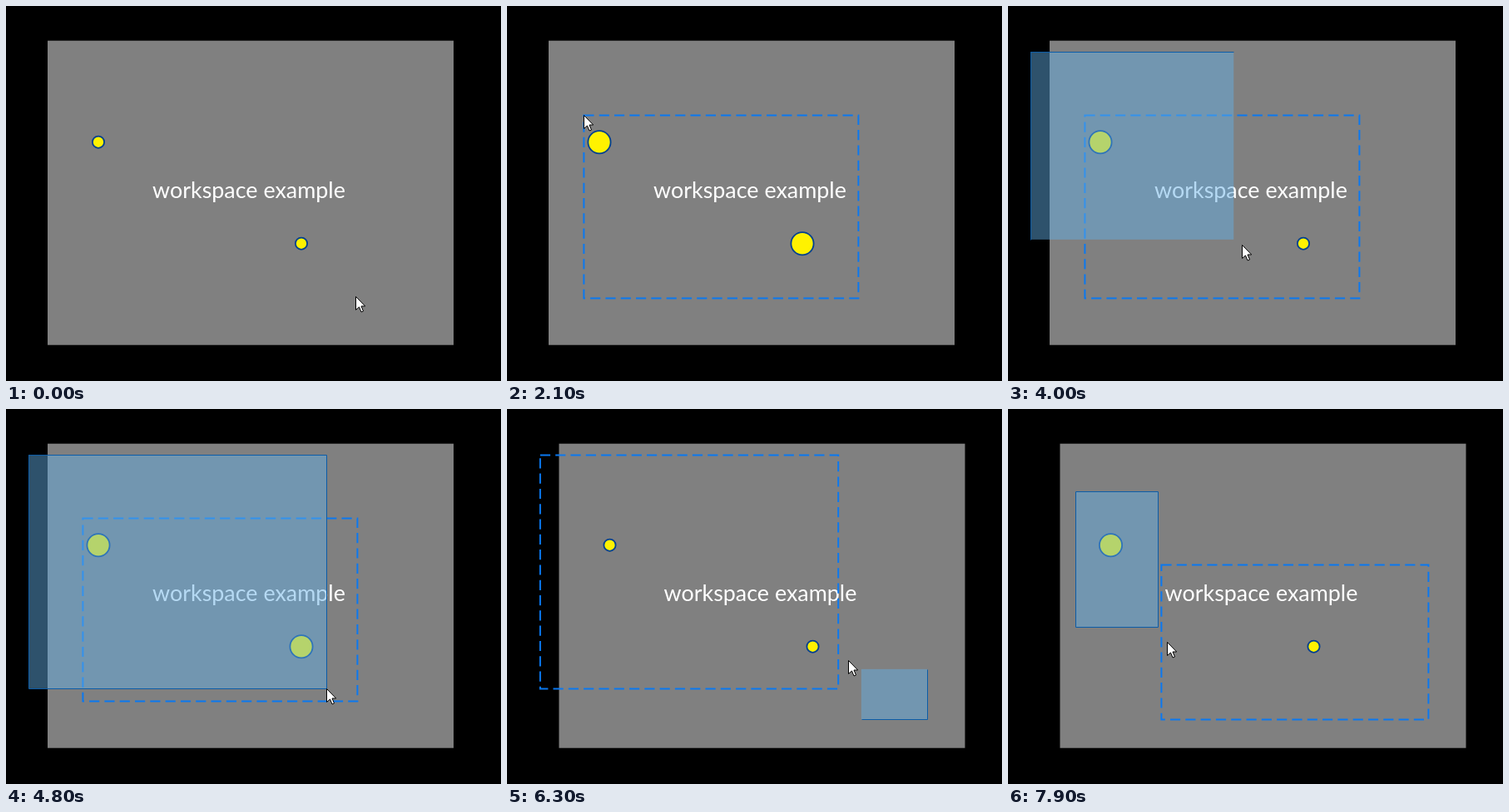
These frames come from a looping animation (595x451 px, 8 s). An HTML page with a canvas:

```html
<!DOCTYPE html>
<html lang="en">
<head>
<meta charset="utf-8">
<title>Workspace selection</title>
<style>
  html, body { margin: 0; width: 100%; height: 100%; overflow: hidden; background: #000; }
  canvas { display: block; }
</style>
</head>
<body>
<canvas id="stage" width="595" height="451"></canvas>
<script>
const ctx = document.getElementById('stage').getContext('2d');
const LOOP = 8000, STEP = 100, SCALE = 1.22;

// Pointer path: time, x, y
const path = [
  [0, 420, 349], [100, 422, 351], [200, 422, 351], [900, 151, 165],
  [1100, 95, 144], [1300, 92, 131], [2400, 92, 131], [3000, 27, 65],
  [3100, 27, 65], [3300, 27, 55], [3400, 27, 55], [4000, 281, 287],
  [4400, 384, 335], [4600, 384, 335], [4800, 385, 336], [4950, 385, 336],
  [5700, 505, 373], [5800, 505, 373], [6300, 410, 302], [6700, 184, 187],
  [6950, 184, 187], [7450, 81, 99], [7500, 81, 99], [7900, 191, 280]
];

// The marquee trails the pointer by `lag` and gets its full outline at `settle`.
const drags = [
  { from: 200, to: 2100, settle: 1300, lag: 17 },
  { from: 3400, to: 5000, settle: 4600, lag: 28 },
  { from: 5800, to: 6900, settle: 6750, lag: 56 },
  { from: 7500, to: LOOP, settle: 7500, lag: 36 }
];
const dots = [[50, 100], [250, 200]];

function slope(i, axis) {
  const a = path[i], b = path[i + 1];
  return (b[axis] - a[axis]) / (b[0] - a[0]);
}

function tangent(i, axis) {
  if (i === 0) return slope(0, axis);
  if (i === path.length - 1) return slope(i - 1, axis);
  const a = slope(i - 1, axis), b = slope(i, axis);
  return a * b > 0 ? 2 * a * b / (a + b) : 0;
}

// Monotone cubic interpolation keeps the pointer from overshooting its rests.
function pointer(t) {
  const last = path.length - 1;
  if (t >= path[last][0]) return path[last].slice(1);
  let i = 0;
  while (t >= path[i + 1][0]) i++;
  const a = path[i], b = path[i + 1], span = b[0] - a[0];
  const u = (t - a[0]) / span, v = 1 - u;
  return [1, 2].map(k =>
    a[k] * v * v * (1 + 2 * u) + b[k] * u * u * (3 - 2 * u) +
    span * u * v * (v * tangent(i, k) - u * tangent(i + 1, k)));
}

const shiftAt = t => t >= 5000 ? 12.5 : 0;

function marquee(drag, t) {
  const [ax, ay] = pointer(drag.from);
  const [bx, by] = pointer(Math.max(drag.from, t - drag.lag));
  return { ax, ay, bx, by, x: Math.min(ax, bx), y: Math.min(ay, by),
           w: Math.abs(bx - ax), h: Math.abs(by - ay) };
}

const activeDrag = t => drags.find(d => t >= d.from && t < d.to);

function covered(x, y, t) {
  const drag = activeDrag(t);
  if (!drag) return 0;
  const r = marquee(drag, t), px = x + shiftAt(t);
  return +(px > r.x && px < r.x + r.w && y > r.y && y < r.y + r.h);
}

function drawDot([gx, gy], t) {
  const x = 50 + gx * SCALE, y = 41.7 + gy * SCALE;
  let grow = 0;
  for (let k = 1; k <= 3; k++) grow += covered(x, y, t - k * 50) / 3;
  ctx.beginPath();
  ctx.arc(x + shiftAt(t), y, 7.1 + 6.5 * grow, 0, Math.PI * 2);
  ctx.fillStyle = '#fff200';
  ctx.fill();
  ctx.strokeStyle = '#004090';
  ctx.lineWidth = 1.8;
  ctx.stroke();
}

function drawSelection(t) {
  const drag = drags.filter(d => d.to <= t).pop();
  if (!drag) return;
  const r = marquee(drag, drag.to), dx = shiftAt(t) - shiftAt(drag.from);
  ctx.strokeStyle = '#0a78f0';
  ctx.lineWidth = 2;
  ctx.setLineDash([10 * SCALE, 5 * SCALE]);
  ctx.strokeRect(r.x + dx + .4, r.y + .4, r.w, r.h);
  ctx.setLineDash([]);
}

function line(x1, y1, x2, y2) {
  ctx.beginPath();
  ctx.moveTo(x1, y1);
  ctx.lineTo(x2, y2);
  ctx.stroke();
}

function drawMarquee(t) {
  const drag = activeDrag(t);
  if (!drag) return;
  const r = marquee(drag, t);
  if (r.w < 1 || r.h < 1) return;
  ctx.fillStyle = 'rgba(98,174,230,.47)';
  ctx.fillRect(r.x, r.y, r.w, r.h);
  ctx.strokeStyle = '#0b5ca8';
  ctx.lineWidth = 1;
  const snap = n => Math.round(n) + .5;
  const ax = snap(r.ax), ay = snap(r.ay), bx = snap(r.bx), by = snap(r.by);
  line(ax, ay, bx, ay);
  line(ax, ay, ax, by);
  if (t >= drag.settle) {
    line(bx, ay, bx, by);
    line(ax, by, bx, by);
  }
}

function drawPointer(t) {
  const [x, y] = pointer(t).map(Math.round);
  const outline = [[0, 0], [0, 16], [4, 12.5], [6.5, 18.5], [9, 17.5], [6.5, 11.5], [11.2, 11.5]];
  ctx.beginPath();
  outline.forEach(([px, py]) => ctx.lineTo(x + px + .5, y + py + .5));
  ctx.closePath();
  ctx.fillStyle = '#fff';
  ctx.fill();
  ctx.strokeStyle = '#000';
  ctx.lineWidth = 1;
  ctx.stroke();
}

function draw(t) {
  const shift = shiftAt(t);
  ctx.fillStyle = '#000';
  ctx.fillRect(0, 0, 595, 451);
  ctx.fillStyle = '#808080';
  ctx.fillRect(50 + shift, 41.7, 400 * SCALE, 300 * SCALE);
  ctx.fillStyle = '#fff';
  ctx.font = '100px Lato, sans-serif';
  const label = 'workspace example';
  ctx.font = `${23200 / ctx.measureText(label).width}px Lato, sans-serif`;
  ctx.fillText(label, 176 + shift, 230.5);
  dots.forEach(dot => drawDot(dot, t));
  drawSelection(t);
  drawMarquee(t);
  drawPointer(t);
}

const start = performance.now();
function tick() {
  const t = (performance.now() - start) % LOOP;
  draw(Math.floor(t / STEP) * STEP);
  requestAnimationFrame(tick);
}
tick();
</script>
</body>
</html>
```
